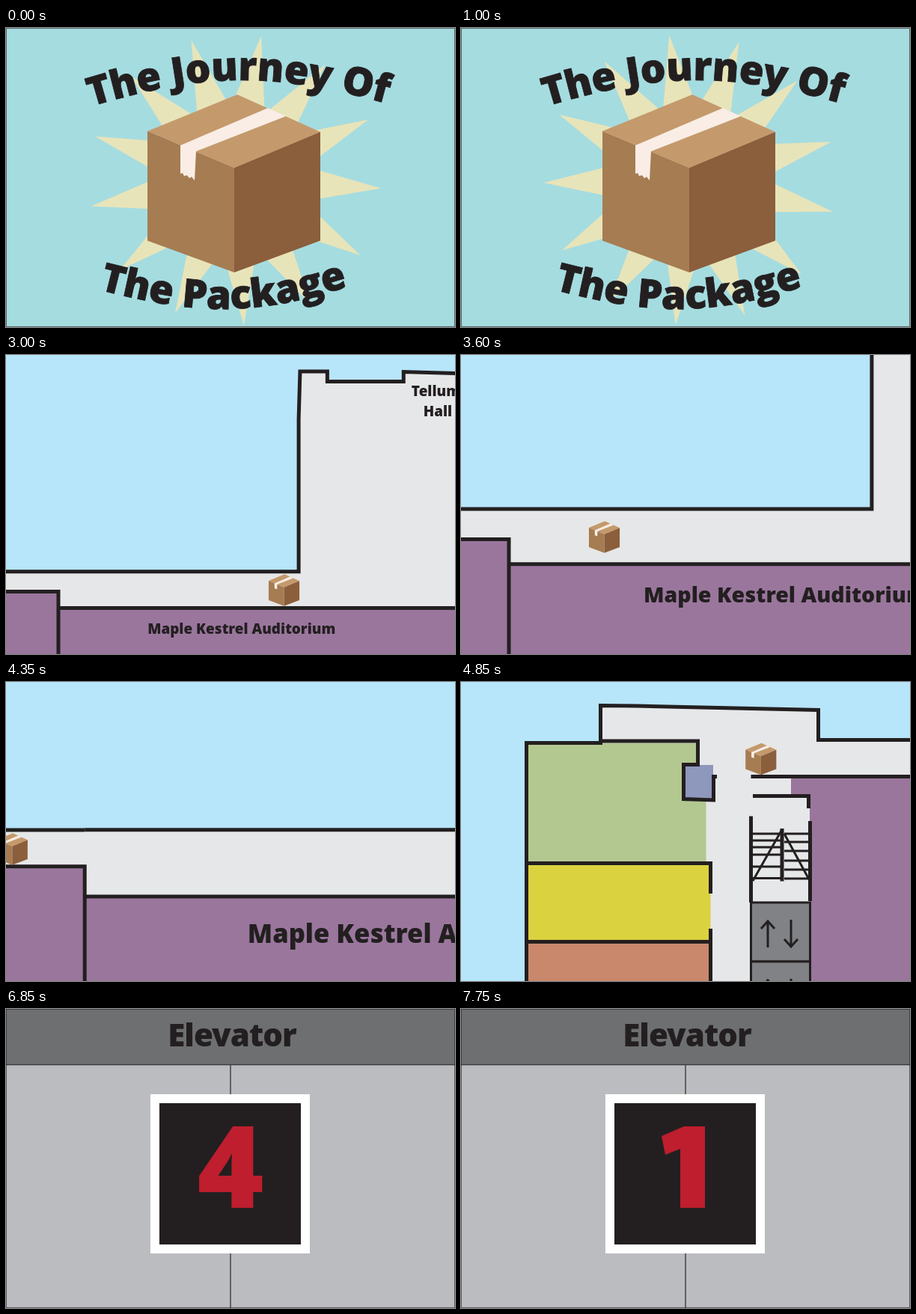
These frames come from a looping animation (600x400 px, 8000 ms). An HTML page:

```html
<!DOCTYPE html>
<html lang="en">
<head>
<meta charset="utf-8">
<title>The Journey Of The Package</title>
<style>
  html, body { margin: 0; width: 100%; height: 100%; overflow: hidden; }
  svg { display: block; width: 100vw; height: 100vh; }
  text { font-family: "Open Sans", "Noto Sans", sans-serif; font-weight: 800; fill: #231f20; }
  .head { font-size: 53px; letter-spacing: -.2px; stroke: #231f20; stroke-width: .8; }
  .label { font-size: 15.3px; }
  .wall, .thin { fill: none; stroke: #231f20; stroke-width: 5; }
  .thin { stroke-width: 3; }
  #map path, #map rect { vector-effect: non-scaling-stroke; }
  .floor { fill: #e6e7e8; }
  .hall { fill: #9a769d; }
  .frame { fill: none; stroke: #231f20; stroke-opacity: .6; }
</style>
</head>
<body>
<svg viewBox="0 0 600 400" preserveAspectRatio="none">
  <defs>
    <g id="box">
      <path fill="#c49a6c" d="M189 138L309 89L420 139L305 187Z"/>
      <path fill="#a67c52" d="M189 138L305 187V327L189 284.500Z"/>
      <path fill="#8b5e3c" d="M305 187L420 139V284.500L305 327Z"/>
      <path fill="#f9ede6" d="M350 107L374 118L254 165L252 204L248 199L245 201L242 197L238 198L236 194L233 195V157Z"/>
    </g>
    <path id="arcTop" d="M114 105C270 58 360 58 530 107"/>
    <path id="arcLow" d="M124 350C260 386 340 386 472 341"/>
    <g id="lift">
      <rect class="thin" x="387.5" y="295" width="79" height="79" style="fill:#808285"/>
      <path class="thin" d="M410 355V320M401 330L410 320L419 330M441 318V353M432 344L441 354L450 344"/>
    </g>
  </defs>

  <g id="title">
    <rect width="600" height="400" fill="#a5dce0"/>
    <path id="star" fill="#e8e4b9"/>
    <use href="#box"/>
    <text class="head"><textPath href="#arcTop">The Journey Of</textPath></text>
    <text class="head"><textPath href="#arcLow">The Package</textPath></text>
    <rect class="frame" x=".5" y=".5" width="599" height="399"/>
  </g>

  <g id="plan">
    <rect width="600" height="400" fill="#b7e5fa"/>
    <g id="map">
      <rect x="-100" y="-100" width="900" height="159.5" fill="#424243"/>
      <path class="floor" d="M98 294.800H358.5V130L360 78H389V89H472V78L562 81V334H98Z"/>
      <path class="hall" d="M98.5 334.300H561.5V520H98.5Z"/>

      <g transform="translate(98.5 316.5) scale(.44248) translate(-694.5 -126.5)">
        <path class="floor" d="M186.5 31.5H235L477.5 37.5V77.500H700V126.5H694V600H87.5V81.5H186.5Z"/>
        <path class="hall" d="M441 126.5H694.5V600H466V152H441Z"/>
        <path fill="#b3c890" d="M88 82H316V110H298V157H327.5V240H88Z"/>
        <path fill="#8e97bc" d="M298 111H337V158L298 156Z"/>
        <path fill="#dad33f" d="M88 245H333.5V346H88Z"/>
        <path fill="#c9886c" d="M88 348H333V600H88Z"/>
        <path class="wall" d="M694.5 77.500H477.5V37.5L235 32L186.5 31.5V81.5H87.5V600
          M186.5 79H316.5V110.5H297.5V156.5L337.5 158V126.5H342
          M87.5 242.5H333.5V283M333.5 330V600M87.5 347.5H333.5
          M387.5 126.5H694.5V600M390 152.5H464.5V169"/>
        <use href="#lift"/>
        <use href="#lift" y="79"/>
        <path class="wall" d="M387.5 179.5V295M466.5 186V293M429 196V266.5"/>
        <path class="thin" d="M388 203H429M388 212H429M388 221H429M388 231H429M388 247H429M388 262.5H429
          M432 203H466M432 214H466M432 226H466M432 239H466M432 251H466M432 263H466
          M390 266L428 199M432 203L465 264"/>
      </g>

      <path class="wall" d="M98.5 294.800H358.5V130L360 78H389.5V89H472V78.5L562 81V334.300H98.5"/>
      <text class="label" x="195" y="362">Maple Kestrel Auditorium</text>
      <g text-anchor="middle">
        <text class="label" x="507" y="105">Tellum</text>
        <text class="label" x="509" y="127">Hall</text>
        <text class="label" x="532.5" y="32" style="fill:#fff">N. 738th Street</text>
      </g>
      <path fill="#3f2212" d="M280 6.500H365V41H368V49H262V42L265 39V29Z"/>
      <path fill="#fff" d="M277 11.500H284.500V26.500H271ZM287 11.500H300V26.500H287Z"/>
      <g fill="#fff" stroke="#3f2212" stroke-width="3">
        <circle cx="278" cy="48" r="7"/>
        <circle cx="344" cy="48" r="7"/>
      </g>
    </g>
    <use id="parcel" href="#box"/>
  </g>

  <g id="elevator">
    <rect width="600" height="400" fill="#bbbcc0"/>
    <rect width="600" height="74" fill="#6d6f71"/>
    <path d="M0 74.500H600M300 75V400" stroke="#3c3d3f" stroke-width="1.400"/>
    <rect class="frame" x=".5" y=".5" width="599" height="399"/>
    <text x="302" y="50" font-size="42" letter-spacing="-1" text-anchor="middle">Elevator</text>
    <rect x="193" y="114" width="213" height="213" fill="#fff"/>
    <rect x="205" y="126" width="189" height="189" fill="#231f20"/>
    <text id="digit" x="300" y="266" font-size="152" text-anchor="middle" style="fill:#be1e2d"></text>
    <path id="one" fill="#be1e2d" d="M298 157H326V266H293V187L273 195L268 170Z"/>
  </g>
</svg>

<script>
const LOOP = 8000, STEP = 50;
const $ = id => document.getElementById(id);
const show = (id, on) => $(id).style.display = on ? '' : 'none';

// time, screen position of the hall corner, zoom
const camera = [
  [2150, 100.3, 316.5, .985],
  [3000, 70, 316.5, 1.235],
  [3600, 64, 246.5, 1.865],
  [3850, 66, 230, 2.08],
  [4350, 105.2, 246.8, 2.255],
  [4700, 694.5, 126.5, 2.26]
];

// time, screen position of the parcel's centre
const route = [
  [2150, 421.5, 26.5],
  [2874, 421.5, 314.5],
  [3000, 371.5, 314.5],
  [3600, 191.5, 243.5],
  [3850, 122, 227],
  [4000, 89, 214],
  [4350, 8.3, 223.5],
  [4700, 458.5, 103],
  [4952, 361.5, 103],
  [5550, 361.5, 333.5]
];

function at(keys, t) {
  if (t <= keys[0][0]) return keys[0].slice(1);
  const i = keys.findIndex(k => k[0] > t);
  if (i < 0) return keys[keys.length - 1].slice(1);
  const a = keys[i - 1], b = keys[i];
  const p = (t - a[0]) / (b[0] - a[0]);
  return a.slice(1).map((v, n) => v + (b[n + 1] - v) * p);
}

function starPath(turn) {
  const rays = 13, points = [];
  for (let i = 0; i < rays * 2; i++) {
    const r = i % 2 ? 97 : 195.5;
    const a = (3.4 + turn + i * 180 / rays) * Math.PI / 180;
    points.push((306 + r * Math.cos(a)).toFixed(1) + ' ' + (203 + r * Math.sin(a)).toFixed(1));
  }
  return 'M' + points.join('L') + 'Z';
}

function draw(time) {
  const t = Math.floor(time / STEP) * STEP;
  show('title', t < 1500);
  show('plan', t >= 1500 && t < 6550);
  show('elevator', t >= 6550);

  if (t < 1500) {
    $('star').setAttribute('d', starPath(-9.23 * Math.floor(t / 500)));
  } else if (t < 6550) {
    const [cx, cy, zoom] = at(camera, t);
    const [x, y] = at(route, t);
    $('map').setAttribute('transform', `translate(${cx} ${cy}) scale(${zoom}) translate(-98.5 -316.5)`);
    $('parcel').setAttribute('transform', `translate(${x} ${y}) scale(.178) translate(-304.5 -208)`);
    show('parcel', t >= 1700);
  } else {
    const level = 5 - Math.floor((t - 6550) / 300);
    $('digit').textContent = level > 1 ? level : '';
    show('one', level === 1);
  }
}

const start = performance.now();
function tick() {
  draw((performance.now() - start) % LOOP);
  requestAnimationFrame(tick);
}
tick();
</script>
</body>
</html>
```
